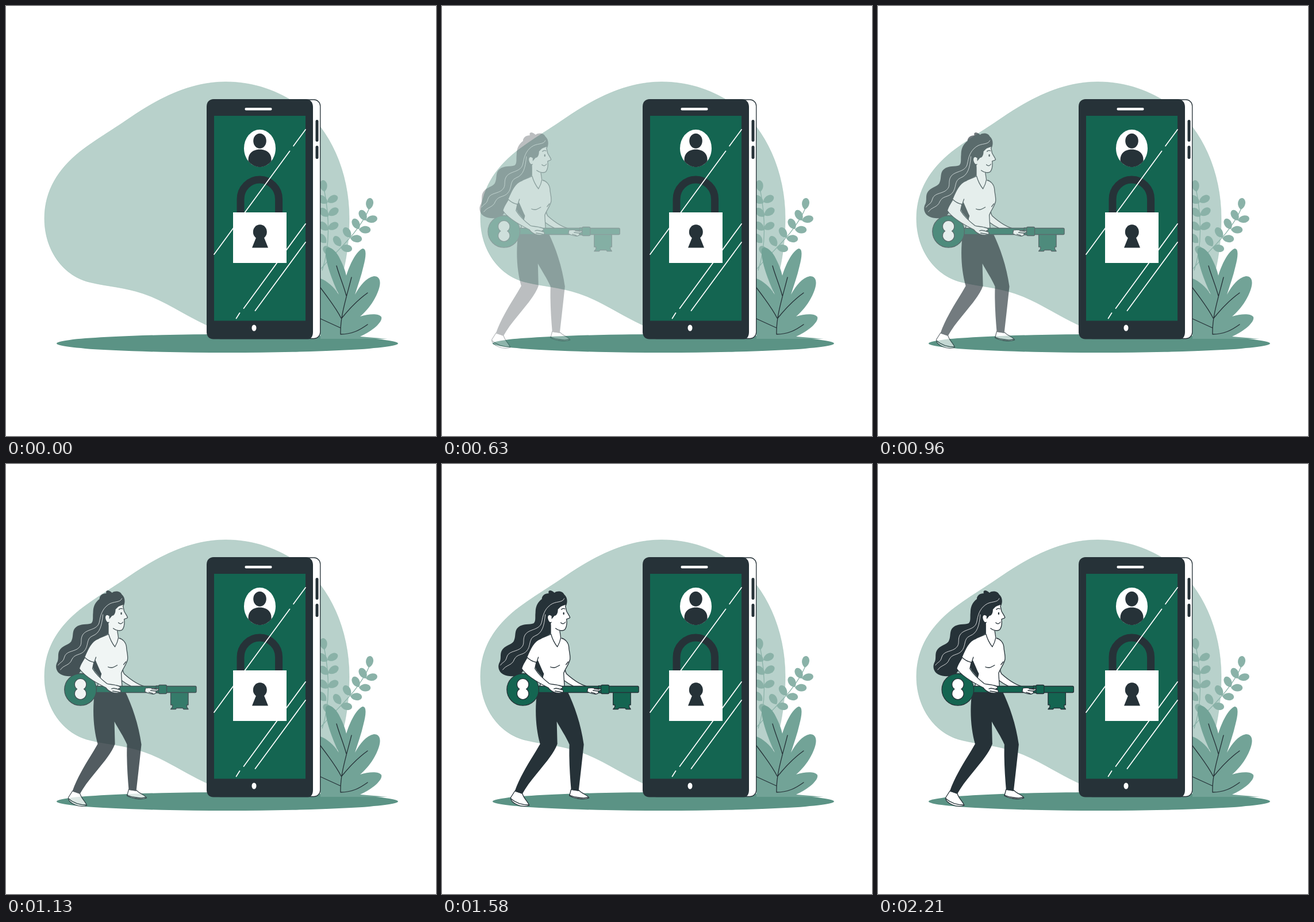
An HTML page that plays this animation: 748x748 px, repeating every 2.25 s.

```html
<!DOCTYPE html>
<html lang="en">
<head>
<meta charset="utf-8">
<title>Key and locked phone</title>
<style>
html, body { margin: 0; width: 100%; height: 100%; overflow: hidden; background: #fff; }
svg { display: block; width: 100%; height: 100%; }
.ink { fill: #263238; }
.white { fill: #fff; }
.main { fill: #146551; }
.line { fill: none; stroke: #263238; stroke-width: 1.3; stroke-linecap: round; stroke-linejoin: round; }
.skin { fill: #fff; stroke: #263238; stroke-width: 1.3; stroke-linejoin: round; }
.metal { fill: #146551; stroke: #263238; stroke-width: 1.3; stroke-linejoin: round; }
.shine { fill: none; stroke: #fff; stroke-width: 1.7; stroke-linecap: round; }
.strand { fill: none; stroke: #fff; stroke-width: .8; stroke-linecap: round; }
</style>
</head>
<body>
<svg viewBox="0 0 748 748">
  <path fill="#b8d1cb" stroke="#a5c5bc" stroke-width=".6" d="M67 370C67 320 92 283 128 254C158 231 180 219 215 195C262 163 318 132 382 132C432 132 474 148 510 173C565 215 597 290 597 370C597 450 575 520 540 560C510 590 420 590 349 555C310 537 275 512 238 500C205 489 178 488 148 481C100 471 67 425 67 370Z"/>
  <ellipse cx="385" cy="587" rx="297" ry="16" fill="#5b9385"/>

  <g id="sprigs" fill="#8ab2a8">
    <path fill="none" stroke="#8ab2a8" stroke-width="1.3" d="M548 457C575 425 612 398 633 350M550 460C563 420 564 370 552 312"/>
  </g>
  <path fill="#72a397" d="M547 474C558 478 570 488 579 502C566 475 554 440 556 424C559 414 574 424 581 440C587 452 590 460 592 469C598 450 608 428 620 422C628 421 626 437 622 452C618 470 612 486 607 502C616 486 626 473 640 470C652 470 653 482 647 497C640 515 628 530 616 540C630 536 648 534 653 541C656 551 633 568 616 575L664 579H547Z"/>
  <path class="line" d="M582 571C581 540 592 508 601 472M575 452C580 470 587 485 592 504M629 499C612 511 597 527 584 543M547 490C559 506 574 525 583 543M547 544L582 560M582 571C602 571 615 564 629 554"/>

  <rect x="362" y="163" width="184.700" height="415.500" rx="11" class="skin"/>
  <path class="ink" d="M361 162H521C529 162 534 167 534 176V567C534 574 531 579.500 525 579.500H361C353 579.500 349 574 349 567V175C349 167 354 162 361 162Z"/>
  <rect class="main" x="362" y="191" width="159" height="356.500"/>
  <rect class="white" x="415.500" y="177" width="47" height="4.500" rx="2"/>
  <ellipse class="white" cx="431.500" cy="560" rx="4" ry="5.500"/>
  <rect class="ink" x="538.500" y="198" width="5" height="38" rx="2.500"/>
  <rect class="ink" x="538.500" y="243" width="5" height="23" rx="2.500"/>

  <ellipse class="white" cx="441.500" cy="247.500" rx="27.500" ry="32.500"/>
  <ellipse class="ink" cx="441.500" cy="234.700" rx="11.300" ry="13"/>
  <path class="ink" d="M421.500 270V267C421.500 256 430 249.500 441.500 249.500S461.500 256 461.500 267V270A27.500 32.500 0 0 1 421.500 270Z"/>

  <path fill="none" stroke="#263238" stroke-width="13" d="M408 362V336A33.300 34 0 0 1 474.600 336V362"/>
  <path class="shine" d="M362 432L493.500 252.500M500 243.500L521 215M521 379L413.500 526M406.500 534L400.500 543.500M521 411L433.500 530"/>
  <rect class="white" x="395" y="359" width="93" height="88"/>
  <ellipse class="ink" cx="441.800" cy="393" rx="12" ry="12.700"/>
  <path class="ink" d="M437 398L428 420.500H456L447 398Z"/>

  <g id="woman" opacity="0">
    <!-- hair -->
    <path class="ink" d="M216 247C219 241 219 232 213 227C210 221 201 220 196 224C190 218 184 219 186 225C179 225 174 229 174 235C167 240 163 248 163 258C162 266 164 273 160 277C152 280 141 277 133 284C126 290 129 298 126 306C124 314 113 314 106 322C100 329 104 337 101 344C96 352 99 362 107 366C117 371 130 370 138 365L152 345L168 306L192 294L200 254Z"/>
    <path class="strand" d="M213 234C210 242 198 238 189 245C178 253 176 264 174 274C171 290 152 286 145 297C139 307 147 314 135 322C126 327 116 326 113 336C111 345 106 344 102 350M180 262C178 282 175 294 162 299C150 304 156 317 147 326C140 333 131 330 126 340C122 351 112 349 106 358"/>

    <!-- legs -->
    <path class="skin" d="M127 569L120 580C119 585 124 590 132 593C139 596 148 596 152 594C150 587 143 583 140 573ZM225 566L222 577C229 581 246 585 256 581C255 576 244 574 239 568Z"/>
    <path class="line" d="M120 582C128 589 139 593 151 593M222 576C231 580 246 582 255 580"/>
    <path class="ink" d="M166 394C161 430 164 462 171 487C157 512 139 536 127 569L140 574C157 543 191 514 201 487L200 448C207 461 216 474 222 488C221 515 223 543 225 567L238 569C241 543 244 516 247 488C242 452 231 421 218 394Z"/>

    <!-- far arm, torso, head -->
    <path class="skin" d="M216 345C215 353 213 359 217 365C228 375 241 385 257 388L256 396C240 393 222 384 209 374Z"/>
    <path class="skin" d="M170 305C178 300 184 299 190 296L208 303C214 304 220 310 221 318C221 325 224 332 223 340C221 349 214 357 212 364L214 398H167L177 365L165 345Z"/>
    <path class="ink" d="M167 341L161 350L165 359L176 372L177 364Z"/>
    <path class="white" d="M190 270V298C193 306 197 313 201 318C204 313 207 308 208 302L205 290Z"/>
    <path class="line" d="M190 296C193 307 197 313 201 318C204 313 206 308 207 302L205 289M189 353C195 356 200 353 205 350M216 349L220 344"/>
    <path class="white" d="M191 254C201 252 207 247 215 245L217 256C219 260 222 264 223 267C222 269 219 270 217 270C218 277 217 284 214 288C211 291 205 291 200 288L190 280Z"/>
    <path class="line" d="M215 247L217 256C219 260 222 264 223 267C222 269 219 269 217 270C218 277 217 284 214 288C211 291 203 290 198 286M207 276C210 279 213 278 215 275M208 253C210 251 213 251 214 252"/>
    <ellipse class="ink" cx="212" cy="260" rx="1.200" ry="2.200"/>
    <path class="ink" d="M184 264C187 251 198 246 210 245L202 253C202 259 200 264 196 264L191 270Z"/>
    <path class="skin" d="M191 264C187 260 183 263 184 269C185 274 188 277 191 275"/>

    <!-- key -->
    <path class="metal" d="M298 397V419H301V423L298 426.500H306.500L308 424.500H319L320.500 426.500H328.500L326 423V419H328.500V397Z"/>
    <rect class="metal" x="160" y="386.500" width="182.500" height="11" rx="2"/>
    <rect class="metal" x="272.500" y="386" width="6" height="12"/>
    <rect class="metal" x="277" y="384.500" width="14" height="15" rx="2"/>
    <circle class="metal" cx="141" cy="392.300" r="27.800"/>
    <path class="skin" d="M135 391.500A10.200 10 0 1 1 147 391.500A10.200 10 0 1 1 135 391.500Z"/>

    <!-- hands and near arm -->
    <path class="skin" d="M254 390C260 388 267 390 276 391C278 393 275 395 272 395C274 398 270 401 266 400C261 400 257 398 253 396Z"/>
    <path class="line" d="M263 394L272 395M260 397L267 399M265 391L274 392"/>
    <path class="skin" d="M150 334C146 342 140 349 139 356C147 368 165 379 185 389C190 396 199 400 209 398C213 396 212 393 207 391C213 390 210 386 203 385C197 383 191 384 187 382C178 375 168 366 162 356L165 342Z"/>
    <path class="line" d="M195 391C200 389 205 391 209 393M197 395L209 397"/>
    <path class="white" d="M172 304C160 308 154 322 148 336C152 340 158 344 165 345L176 325Z"/>
    <path class="line" d="M172 304C160 308 154 322 148 336C152 340 158 344 165 345L168 336"/>
  </g>
</svg>
<script>
const LOOP = 2250, SLIDE = 2150, TRAVEL = 45, REST = 1.047;
const woman = document.getElementById('woman');
const sprigs = document.getElementById('sprigs');

// Leaf stalk position and direction in degrees
const leaves = [
  [631, 354, -78], [626, 373, -115], [626, 373, -8], [614, 388, -115], [614, 389, 5],
  [599, 403, -118], [599, 404, 8], [582, 418, -118], [582, 420, 12], [566, 434, -125],
  [554, 323, -95], [559, 341, -25], [559, 343, -140], [561, 364, -30], [561, 366, -135],
  [560, 388, -25], [560, 390, -135], [557, 412, -130]
];
for (const [x, y, angle] of leaves) {
  const leaf = document.createElementNS('http://www.w3.org/2000/svg', 'path');
  leaf.setAttribute('d', 'M0 0C3-6 10-9 17-6C23-2 20 4 13 5.500C7 6 3 4 0 0Z');
  leaf.setAttribute('transform', `translate(${x} ${y}) rotate(${angle})`);
  sprigs.append(leaf);
}

const bezier = (a, b, s) => 3 * (1 - s) * s * ((1 - s) * a + s * b) + s ** 3;

// Overshooting cubic-bezier(.36, -.01, .5, 1.38)
function ease(x) {
  let lo = 0, hi = 1;
  for (let i = 0; i < 24; i++) {
    const mid = (lo + hi) / 2;
    if (bezier(.36, .5, mid) < x) lo = mid; else hi = mid;
  }
  return bezier(-.01, 1.38, lo);
}

function draw(now) {
  const p = ease(Math.min(1, now % LOOP / SLIDE));
  woman.setAttribute('opacity', Math.max(0, Math.min(1, p)));
  woman.setAttribute('transform', `translate(${(p - REST) * TRAVEL} 0)`);
  requestAnimationFrame(draw);
}
requestAnimationFrame(draw);
</script>
</body>
</html>
```
